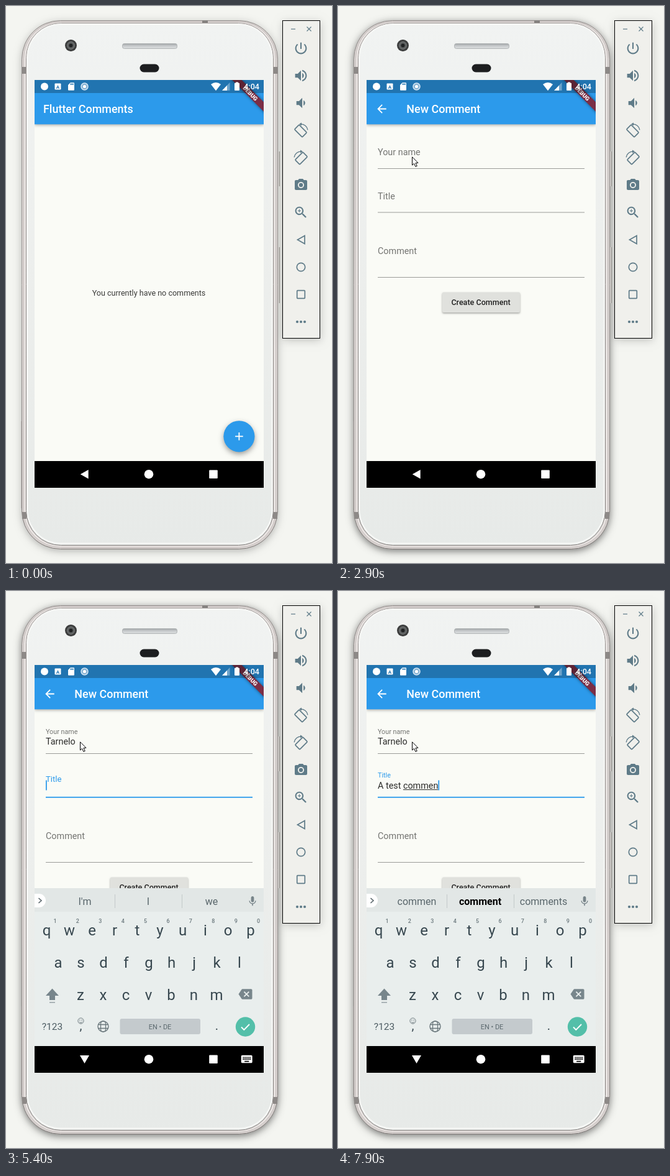
These frames come from a looping animation (525x896 px, 8000 ms). An HTML page with a canvas:

```html
<!DOCTYPE html>
<html lang="en">
<head>
<meta charset="utf-8">
<title>Flutter Comments</title>
<style>
html, body { margin: 0; width: 525px; height: 896px; overflow: hidden; background: #f4f5f1; }
canvas { display: block; }
</style>
</head>
<body>
<canvas id="stage" width="525" height="896"></canvas>
<script>
const ctx = document.getElementById('stage').getContext('2d');
const LOOP = 8000, STEP = 100, NAV_TOP = 732;
const BLUE = '#2c9aeb', PAPER = '#fafbf6', INK = '#2b2b2a', MUTED = '#747572', SLATE = '#5f7b88', KEY = '#37474f';

const ICONS = {
  power: 'M13 3h-2v10h2V3zm4.83 2.17l-1.42 1.42C17.99 7.86 19 9.81 19 12c0 3.87-3.13 7-7 7s-7-3.13-7-7c0-2.19 1.01-4.14 2.58-5.42L6.17 5.17C4.23 6.82 3 9.26 3 12c0 4.97 4.03 9 9 9s9-4.03 9-9c0-2.74-1.23-5.18-3.17-6.83z',
  volumeUp: 'M3 9v6h4l5 5V4L7 9H3zm13.5 3c0-1.77-1.02-3.29-2.5-4.03v8.05c1.48-.73 2.5-2.25 2.5-4.02zM14 3.23v2.06c2.89.86 5 3.54 5 6.71s-2.11 5.85-5 6.71v2.06c4.01-.91 7-4.49 7-8.77s-2.99-7.86-7-8.77z',
  volumeDown: 'M18.5 12c0-1.77-1.02-3.29-2.5-4.03v8.05c1.48-.73 2.5-2.25 2.5-4.02zM5 9v6h4l5 5V4L9 9H5z',
  camera: 'M9 2L7.17 4H4c-1.1 0-2 .9-2 2v12c0 1.1.9 2 2 2h16c1.1 0 2-.9 2-2V6c0-1.1-.9-2-2-2h-3.17L15 2H9zm3 15c-2.76 0-5-2.24-5-5s2.24-5 5-5 5 2.24 5 5-2.24 5-5 5z',
  zoom: 'M15.5 14h-.79l-.28-.27C15.41 12.59 16 11.11 16 9.5 16 5.91 13.09 3 9.5 3S3 5.91 3 9.5 5.91 16 9.5 16c1.61 0 3.09-.59 4.23-1.57l.27.28v.79l5 4.99L20.49 19l-4.99-5zm-6 0C7.01 14 5 11.99 5 9.5S7.01 5 9.5 5 14 7.01 14 9.5 11.99 14 9.5 14zM12 10h-2v2H9v-2H7V9h2V7h1v2h2v1z',
  back: 'M20 11H7.83l5.59-5.59L12 4l-8 8 8 8 1.41-1.41L7.83 13H20v-2z',
  erase: 'M22 3H7c-.69 0-1.23.35-1.59.88L0 12l5.41 8.11c.36.53.9.89 1.59.89h15c1.1 0 2-.9 2-2V5c0-1.1-.9-2-2-2zm-3 12.59L17.59 17 14 13.41 10.41 17 9 15.59 12.59 12 9 8.41 10.41 7 14 10.59 17.59 7 19 8.41 15.41 12 19 15.59z',
  mic: 'M12 14c1.66 0 2.99-1.34 2.99-3L15 5c0-1.66-1.34-3-3-3S9 3.34 9 5v6c0 1.66 1.34 3 3 3zm5.3-3c0 3-2.54 5.1-5.3 5.1S6.7 14 6.7 11H5c0 3.41 2.72 6.23 6 6.72V21h2v-3.28c3.28-.48 6-3.3 6-6.72h-1.7z',
  keyboard: 'M20 5H4c-1.1 0-1.99.9-1.99 2L2 17c0 1.1.9 2 2 2h16c1.1 0 2-.9 2-2V7c0-1.1-.9-2-2-2zm-9 3h2v2h-2V8zm0 3h2v2h-2v-2zM8 8h2v2H8V8zm0 3h2v2H8v-2zm-1 2H5v-2h2v2zm0-3H5V8h2v2zm9 7H8v-2h8v2zm0-4h-2v-2h2v2zm0-3h-2V8h2v2zm3 3h-2v-2h2v2zm0-3h-2V8h2v2z',
  card: 'M18 2h-8L4.02 8 4 20c0 1.1.9 2 2 2h12c1.1 0 2-.9 2-2V4c0-1.1-.9-2-2-2zm-6 6h-2V4h2v4zm3 0h-2V4h2v4zm3 0h-2V4h2v4z'
};
for (const name in ICONS) ICONS[name] = new Path2D(ICONS[name]);

// time, x, y of the mouse pointer
const POINTER = [
  [100, 366, 819], [200, 366, 819], [300, 368, 653], [400, 370, 682], [800, 370, 682],
  [900, 326, 667], [1000, 326, 667], [1300, 169, 398], [1400, 215, 470], [1600, 365, 685],
  [1700, 368, 688], [1800, 366, 660], [1900, 331, 517], [2300, 205, 350], [2800, 119, 244], [2900, 119, 242]
];

// time, name, title, suggestions
const TYPING = [
  [0, '', '', "I'm|I|we"],
  [4100, 'T', '', 'T|The|To'],
  [4200, 'Ta', '', 'Ta|Take|Talk'],
  [4400, 'Tar', '', 'Tar|Tart|Tarot'],
  [4500, 'Tarn', '', 'Tarn|Tarns|Tarnelind'],
  [4800, 'Tarnel', '', 'Tarnel|Tarnelo|Tarnelind'],
  [4900, 'Tarnelo', '', 'Tarnelo|Tarnelos|Tarnelind'],
  [5400, 'Tarnelo', '', "I'm|I|we"],
  [6300, 'Tarnelo', 'A', 'A|And|At'],
  [6400, 'Tarnelo', 'A ', 'few|lot|little'],
  [6600, 'Tarnelo', 'A t', 't|the|to'],
  [6700, 'Tarnelo', 'A te', 'te|the|tell'],
  [6800, 'Tarnelo', 'A tes', 'tes|test|yes'],
  [6900, 'Tarnelo', 'A test', 'test|tests|testing'],
  [7000, 'Tarnelo', 'A test ', 'of|for|is'],
  [7200, 'Tarnelo', 'A test c', 'c|can|come'],
  [7300, 'Tarnelo', 'A test co', 'co|come|could'],
  [7400, 'Tarnelo', 'A test com', 'com|come|comes'],
  [7700, 'Tarnelo', 'A test comme', 'commen|*comment|comments'],
  [7900, 'Tarnelo', 'A test commen', 'commen|*comment|comments']
];

const clamp = v => Math.max(0, Math.min(1, v));
const mix = (a, b, p) => a + (b - a) * p;

function text(s, x, y, size, color, weight = 400, align = 'left') {
  ctx.font = `${weight} ${size}px Roboto, sans-serif`;
  ctx.textAlign = align;
  ctx.fillStyle = color;
  ctx.fillText(s, x, y);
  return ctx.measureText(s).width;
}
function rect(x, y, w, h, color) {
  ctx.fillStyle = color;
  ctx.fillRect(x, y, w, h);
}
function round(x, y, w, h, r, fill, stroke, width = 1) {
  ctx.beginPath();
  ctx.roundRect(x, y, w, h, r);
  if (fill) { ctx.fillStyle = fill; ctx.fill(); }
  if (stroke) { ctx.strokeStyle = stroke; ctx.lineWidth = width; ctx.stroke(); }
}
function disc(x, y, r, fill, stroke, width = 1) {
  round(x - r, y - r, 2 * r, 2 * r, r, fill, stroke, width);
}
function poly(points, fill, stroke, width = 1, closed = true) {
  ctx.beginPath();
  points.forEach(([x, y]) => ctx.lineTo(x, y));
  if (closed) ctx.closePath();
  if (fill) { ctx.fillStyle = fill; ctx.fill(); }
  if (stroke) { ctx.strokeStyle = stroke; ctx.lineWidth = width; ctx.stroke(); }
}
function icon(name, cx, cy, size, color) {
  ctx.save();
  ctx.translate(cx - size / 2, cy - size / 2);
  ctx.scale(size / 24, size / 24);
  ctx.fillStyle = color;
  ctx.fill(ICONS[name]);
  ctx.restore();
}
function shaded(color, blur, dy, draw, dx = 0) {
  ctx.save();
  ctx.shadowColor = color;
  ctx.shadowBlur = blur;
  ctx.shadowOffsetX = dx;
  ctx.shadowOffsetY = dy;
  draw();
  ctx.restore();
}
function gradient(y0, y1, ...colors) {
  const g = ctx.createLinearGradient(0, y0, 0, y1);
  colors.forEach((c, i) => g.addColorStop(i / (colors.length - 1), c));
  return g;
}

function drawSideButton(y, h) {
  rect(438, y, 2, h, '#d3d0cd');
  rect(440, y, 1, h, '#98958f');
}
function drawPhone(focus) {
  shaded(`rgba(0,0,0,${mix(.28, .55, focus)})`, 13, 3, () => round(25.5, 23.5, 412, 850, 62, '#d8d2d0'));
  round(25.5, 23.5, 412, 850, 62, '#d8d2d0', gradient(23, 874, '#8e8987', '#a29d9b', '#7d7876'));
  round(28.5, 25.5, 406, 845, 59, '#e8e3e1', '#c6bfbd');
  drawSideButton(234, 56);
  drawSideButton(388, 90);
  rect(24, 668, 1, 140, '#c2bebc');
  for (const y of [98, 814]) {
    rect(26, y, 7, 11, '#8d8987');
    rect(430, y, 7, 11, '#8d8987');
  }
  rect(316, 23, 9, 5, '#858280');
  round(32.5, 27.5, 398, 840, 56, gradient(28, 867, '#f1f3f2', '#eceeec', '#e7eae8'), gradient(28, 867, '#9b9593', '#8f8a88', '#7f7a78'));
  round(34.5, 29.5, 394, 835, 54, null, '#f7f8f6', 2);

  disc(104.5, 63.5, 9.5, '#3c3d3d');
  disc(104.5, 63.5, 6, '#5d6060', '#777a7a');
  disc(104.5, 63.5, 3, '#202223');
  round(187.5, 60.5, 88, 8, 3, gradient(60, 69, '#9b9fa1', '#c9ccce', '#dfe2e2'), '#b0b4b5');
  round(215.5, 93.5, 31, 13, 6.5, '#1d1e20');
}

function drawToolbar() {
  shaded('rgba(0,0,0,.2)', 13, 3, () => rect(445, 23, 61, 512, '#f0f0ec'), 1);
  ctx.strokeStyle = '#000';
  ctx.lineWidth = 1;
  ctx.strokeRect(445.5, 23.5, 60, 511);
  rect(459, 36.5, 7, 1.2, SLATE);
  poly([[484.5, 33.5], [491.5, 40.5]], null, SLATE, 1.2);
  poly([[491.5, 33.5], [484.5, 40.5]], null, SLATE, 1.2);
  icon('power', 475, 68, 25, SLATE);
  icon('volumeUp', 475, 112, 25, SLATE);
  icon('volumeDown', 475, 156, 25, SLATE);
  drawRotate(200, 1);
  drawRotate(244, -1);
  icon('camera', 475, 288, 24, SLATE);
  disc(475, 288, 3.2, SLATE);
  icon('zoom', 475, 332, 25, SLATE);
  poly([[481, 369.5], [481, 382.5], [469.5, 376]], null, SLATE, 1.7);
  disc(475, 420, 6.7, null, SLATE, 1.7);
  round(468.7, 457.7, 12.6, 12.6, 1, null, SLATE, 1.7);
  for (const x of [469, 475, 481]) disc(x, 508, 2.1, SLATE);
}
function drawRotate(y, side) {
  ctx.save();
  ctx.translate(475, y);
  ctx.scale(side, 1);
  ctx.beginPath();
  ctx.arc(0, 1, 11, -1.6, -.15);
  ctx.strokeStyle = SLATE;
  ctx.lineWidth = 1.4;
  ctx.stroke();
  poly([[-3, -10], [1, -12.5], [1, -7.5]], SLATE);
  ctx.translate(-.5, 1);
  ctx.rotate(Math.PI / 4);
  round(-8.8, -5.2, 17.6, 10.4, 1.2, null, SLATE, 1.7);
  ctx.restore();
}

function drawBanner() {
  ctx.save();
  ctx.translate(415, 119);
  ctx.rotate(Math.PI / 4);
  shaded('rgba(0,0,0,.5)', 5, 0, () => rect(-45, 25.1, 90, 10.8, '#7b2e46'));
  text('DEBUG', 0, 33.8, 9.16, '#fff', 900, 'center');
  ctx.restore();
}
function drawStatusBar() {
  rect(46, 119, 369, 21, 'rgba(0,0,0,.25)');
  disc(62, 129.5, 6, '#fff');
  round(78.5, 124.5, 10, 10, 1, '#fff');
  text('A', 83.5, 132.8, 8, '#2574b1', 700, 'center');
  icon('card', 105, 129.5, 15, '#fff');
  disc(126.5, 129.5, 5.5, 'rgba(255,255,255,.45)', '#d5e6f4', 1.5);
  disc(126.5, 129.5, 2.6, '#fff');
  ctx.beginPath();
  ctx.moveTo(338, 136.3);
  ctx.lineTo(330, 126);
  ctx.quadraticCurveTo(338, 119.8, 346, 126);
  ctx.fillStyle = '#fff';
  ctx.fill();
  poly([[360.5, 123], [360.5, 136], [348, 136]], 'rgba(255,255,255,.35)');
  poly([[356, 127.7], [356, 136], [348, 136]], '#fff');
  rect(370, 122.5, 4, 2, '#fff');
  round(368, 123.8, 8, 12.2, 1, '#fff');
  text('4:04', 408, 134, 12.6, '#fff', 500, 'right');
}

function drawAppBar(onForm) {
  shaded('rgba(0,0,0,.35)', 5, 2, () => rect(46, 119, 369, 71.3, BLUE));
  if (onForm) icon('back', 70.5, 165.5, 21.6, '#fff');
  text(onForm ? 'New Comment' : 'Flutter Comments', onForm ? 110.3 : 60, 172.3, 17.96, '#fff', 500);
  drawBanner();
  drawStatusBar();
}

function drawList() {
  text('You currently have no comments', 230, 465.5, 12.57, '#3b3b3a', 400, 'center');
  ctx.save();
  ctx.translate(375.4, 692.3);
  shaded('rgba(0,0,0,.38)', 8, 3.5, () => disc(0, 0, 25.1, BLUE));
  rect(-6.3, -.9, 12.6, 1.8, '#fff');
  rect(-.9, -6.3, 1.8, 12.6, '#fff');
  ctx.restore();
}

// lift: 0 is the resting label, 1 the floated one
function drawField(label, y, lift, focused, value, caret, hint) {
  text(label, 64, mix(y, y - 10.5, lift), mix(14.37, 10.78, lift), focused ? BLUE : MUTED);
  if (focused) rect(64, y + 20.4, 333, 1.8, BLUE);
  else rect(64, y + 21, 333, 1, '#9b9c99');
  if (!value && hint && lift === 1) text(hint, 64, y + 7, 14.37, '#7f807d');
  const width = text(value, 64, y + 7, 14.37, INK);
  if (!focused) return;
  const start = value.lastIndexOf(' ') + 1;
  const from = 64 + ctx.measureText(value.slice(0, start)).width;
  if (start < value.length) rect(from, y + 8.6, 64 + width - from, 1, INK);
  if (caret) rect(64 + width, y - 6, 1.8, 16, BLUE);
}

function drawForm(t, name, title) {
  const onTitle = t >= 5400, caretOff = t >= 5900 && t < 6300;
  drawField('Your name', 240, clamp((t - 3000) / 300), t >= 3100 && !onTitle, name, true, 'Who are you?');
  drawField('Title', 310.5, clamp((t - 5300) / 300), onTitle, title, !caretOff);
  text('Comment', 64, 398.5, 14.37, MUTED);
  rect(64, 436, 333, 1, '#9b9c99');
  shaded('rgba(0,0,0,.35)', 3, 1.5, () => round(168, 460.5, 125, 32.5, 2, '#e0e1dd'));
  text('Create Comment', 230, 481, 12.57, '#222', 500, 'center');
}

function drawKeyRow(letters, x, y) {
  [...letters].forEach((c, i) => text(c, x + i * 36.5, y, 24, KEY, 400, 'center'));
}
function drawKeyboard(words) {
  const soft = '#6b787d';
  rect(46, 478, 369, NAV_TOP - 478, '#e9eeed');
  rect(46, 478, 369, 38, '#e2e7e6');
  round(36, 487, 28, 22, 11, '#fff');
  poly([[52.5, 494], [57, 498], [52.5, 502]], null, '#59666b', 1.6, false);
  rect(175, 488, 1, 22, '#c3c9ca');
  rect(283, 488, 1, 22, '#c3c9ca');
  words.split('|').forEach((word, i) => {
    const strong = word[0] === '*';
    text(word.replace('*', ''), 127 + i * 102, 504.5, 16, strong ? '#000' : '#59666b', strong ? 700 : 400, 'center');
  });
  icon('mic', 397, 499, 19, '#78858a');

  drawKeyRow('qwertyuiop', 65.5, 554);
  [...'1234567890'].forEach((d, i) => text(d, 79 + i * 36.4, 534, 9, soft, 500, 'center'));
  drawKeyRow('asdfghjkl', 84, 606);
  drawKeyRow('zxcvbnm', 120, 657.5);
  poly([[74.5, 639.5], [85, 651], [79, 651], [79, 658], [70, 658], [70, 651], [64, 651]], '#78868c');
  rect(70, 661, 9, 1.6, '#9aa5a9');
  icon('erase', 385.5, 648.5, 22, '#78868c');

  text('?123', 74.5, 706, 15.5, '#4d5c63', 400, 'center');
  disc(120.5, 691.5, 4.6, null, soft, 1);
  disc(118.8, 690.3, .8, soft);
  disc(122.2, 690.3, .8, soft);
  ctx.beginPath();
  ctx.arc(120.5, 692, 2.4, .3, 2.84);
  ctx.stroke();
  text(',', 120.5, 706, 20, KEY, 400, 'center');
  disc(156.5, 700.5, 8.5, null, soft, 1.4);
  round(152.5, 692, 8, 17, 4, null, soft, 1.3);
  for (const y of [697.5, 703.5]) poly([[149, y], [164, y]], null, soft, 1.3);
  round(183.5, 688, 129.5, 25, 3, '#c4cacd');
  text('EN • DE', 248, 704.5, 11, '#5d6a70', 400, 'center');
  text('.', 339.5, 706, 20, KEY, 400, 'center');
  disc(385.5, 701, 15.7, '#53bfa9');
  poly([[379, 701.5], [383.3, 705.8], [392, 697]], null, '#fff', 1.9, false);
}
// The keyboard rises while the page and the navigation bar fade off it.
function slideKeyboard(t, words) {
  const left = clamp((4000 - t) / 200) ** 2;
  ctx.save();
  ctx.translate(0, 64 * left);
  drawKeyboard(words);
  ctx.restore();
  ctx.save();
  ctx.globalAlpha = .53 * left;
  rect(46, 478, 369, NAV_TOP - 478, PAPER);
  rect(46, NAV_TOP, 369, 43, '#000');
  ctx.restore();
}

function drawNavIcons(typing) {
  if (typing) {
    poly([[119, 747], [134, 747], [126.5, 760]], '#fff');
    icon('keyboard', 387.7, 753, 21.5, '#fff');
  } else {
    poly([[132.7, 746], [132.7, 760.5], [119.8, 753.2]], '#fff');
  }
  disc(230, 753.2, 7.3, '#fff');
  round(327.2, 746.5, 13.6, 13.5, 1, '#fff');
}

function drawScreen(t) {
  const [, name, title, words] = TYPING.findLast(row => row[0] <= t);
  const onForm = t >= 1800, keyboard = t >= 3800;
  ctx.save();
  ctx.beginPath();
  ctx.rect(46, 119, 369, 656);
  ctx.clip();
  rect(46, 119, 369, 656, PAPER);
  ctx.save();
  if (keyboard) {
    ctx.beginPath();
    ctx.rect(46, 119, 369, 359);
    ctx.clip();
  }
  if (onForm) drawForm(t, name, title);
  else drawList();
  drawAppBar(onForm);
  ctx.restore();
  rect(46, NAV_TOP, 369, 43, '#000');
  if (keyboard) slideKeyboard(t, words);
  drawNavIcons(t >= 3400);
  ctx.restore();
}

function drawPointer(t) {
  const i = POINTER.findLastIndex(key => key[0] <= t);
  if (i < 0) return;
  const a = POINTER[i], b = POINTER[i + 1] || a;
  const p = b === a ? 0 : (t - a[0]) / (b[0] - a[0]);
  ctx.save();
  ctx.translate(Math.round(mix(a[1], b[1], p)) + .5, Math.round(mix(a[2], b[2], p)) + .8);
  poly([[0, 0], [0, 13.2], [3, 10.6], [5.4, 15.6], [7.7, 14.6], [5.5, 9.8], [9.4, 9.5]], '#fff', '#000', 1);
  ctx.restore();
}

function frame() {
  const t = Math.floor(performance.now() % LOOP / STEP) * STEP;
  rect(0, 0, 525, 896, '#f4f5f1');
  drawPhone(clamp((t - 500) / 200));
  drawScreen(t);
  drawToolbar();
  drawPointer(t);
  requestAnimationFrame(frame);
}
frame();
</script>
</body>
</html>
```
